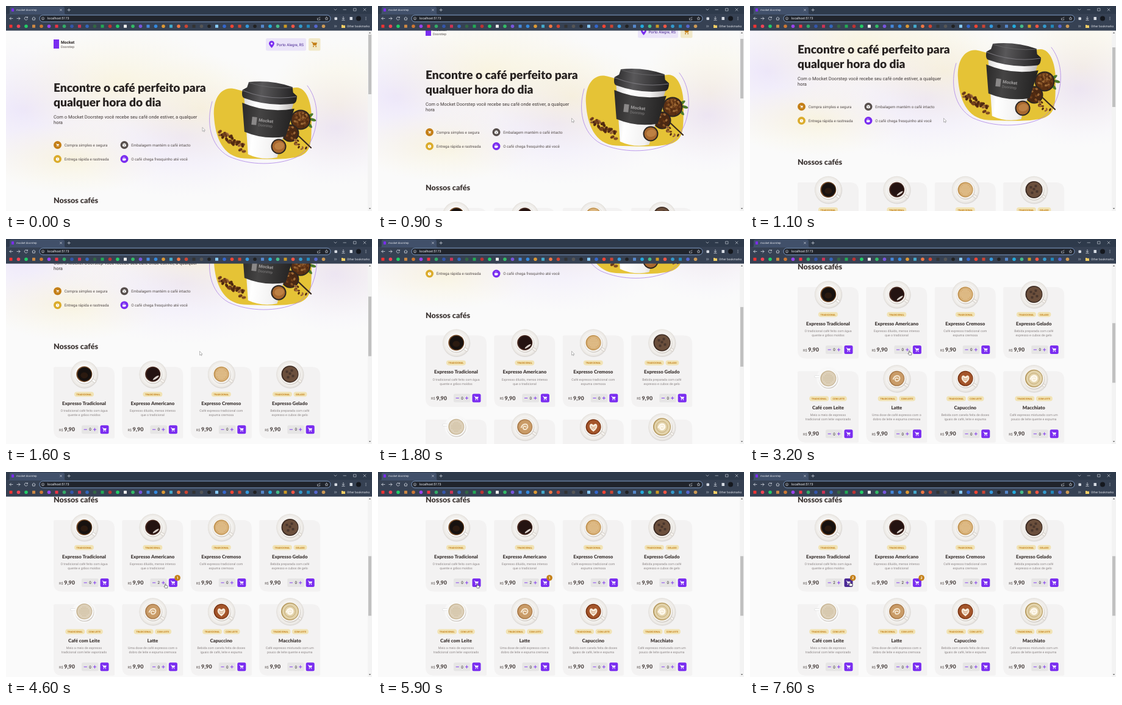
These frames come from a looping animation (600x337 px, 8000 ms). An HTML page:

```html
<!DOCTYPE html>
<html lang="pt-BR">
<head>
<meta charset="utf-8">
<title>mocket doorstep</title>
<style>
html, body { margin: 0; width: 100%; height: 100%; overflow: hidden; background: #fafafa; }
svg { display: block; width: 600px; height: 337px; text-rendering: geometricPrecision; }
text { font-family: Roboto, sans-serif; }
.h { font-family: Lato, sans-serif; font-weight: 900; }
</style>
</head>
<body>
<svg id="stage" viewBox="0 0 600 337">
  <defs>
    <radialGradient id="lilac"><stop offset="0" stop-color="#e0d4fa" stop-opacity=".5"/><stop offset="1" stop-color="#ece4fb" stop-opacity="0"/></radialGradient>
    <radialGradient id="cream"><stop offset="0" stop-color="#f7ecc0" stop-opacity=".45"/><stop offset="1" stop-color="#f8f0d0" stop-opacity="0"/></radialGradient>
    <radialGradient id="saucer"><stop offset=".6" stop-color="#dfdcd9"/><stop offset=".73" stop-color="#f5f4f2"/><stop offset=".94" stop-color="#ece9e5"/><stop offset="1" stop-color="#e0ddd8"/></radialGradient>
    <linearGradient id="paper"><stop offset="0" stop-color="#d9d8d8"/><stop offset=".25" stop-color="#fff"/><stop offset=".7" stop-color="#f2f1f1"/><stop offset="1" stop-color="#bdb9b7"/></linearGradient>
    <linearGradient id="sleeve"><stop offset="0" stop-color="#2a2929"/><stop offset=".35" stop-color="#454444"/><stop offset="1" stop-color="#232222"/></linearGradient>
    <linearGradient id="lid"><stop offset="0" stop-color="#2b2a2b"/><stop offset=".35" stop-color="#59585a"/><stop offset="1" stop-color="#201f20"/></linearGradient>
    <g id="cart"><path d="M-4-3.4h1.7l.5 1.2h5.6l-1.2 3.6h-4.2l-1.3-4h-1.1z"/><circle cx="-1.2" cy="2.9" r=".9"/><circle cx="2.2" cy="2.9" r=".9"/></g>
  </defs>
  <g id="page"></g>
  <g id="bar"></g>
  <g id="chrome"></g>
  <g id="cursor">
    <path id="arrow" d="M-2-3.5v6.6l1.6-1.4 1 2.2 1-.5-1-2.1h2z" fill="#fff" stroke="#777" stroke-width=".5"/>
    <path id="hand" d="M-1.3-3.5q.8-.7 1.2.2v2l2.6.7q.7.3.5 1.2l-.5 2.7h-3.6l-2-2.6q0-1 1.8-.1z" fill="#fff" stroke="#222" stroke-width=".55"/>
  </g>
</svg>
<script>
const $ = id => document.getElementById(id);
const PURPLE = '#7a2df0', DARK = '#4b2995', GOLD = '#c47f17', INK = '#403937';

const rect = (x, y, w, h, fill, r = 0, extra = '') => `<rect x="${x}" y="${y}" width="${w}" height="${h}" rx="${r}" fill="${fill}" ${extra}/>`;
const disc = (x, y, r, fill, extra = '') => `<circle cx="${x}" cy="${y}" r="${r}" fill="${fill}" ${extra}/>`;
const oval = (x, y, rx, ry, fill, turn = 0) => `<ellipse rx="${rx}" ry="${ry}" fill="${fill}" transform="translate(${x} ${y}) rotate(${turn})"/>`;
const path = (d, fill, stroke = 'none', w = 1) => `<path d="${d}" fill="${fill}" stroke="${stroke}" stroke-width="${w}" stroke-linecap="round"/>`;
const line = (d, color, w = .9) => path(d, 'none', color, w);
const text = (x, y, size, fill, s, extra = '') => `<text x="${x}" y="${y}" font-size="${size}" fill="${fill}" ${extra}>${s}</text>`;
const at = (x, y, body, more = '') => `<g transform="translate(${x} ${y}) ${more}">${body}</g>`;
const cart = (x, y, fill, k = 1) => `<use href="#cart" fill="${fill}" transform="translate(${x} ${y}) scale(${k})"/>`;
const MID = 'text-anchor="middle" ', HEAD = 'class="h"';

let seed = 7;
const rnd = () => (seed = seed * 16807 % 2147483647) / 2147483647;
const bean = (x, y, k = 1) => {
  const a = rnd() * 180, c = ['#7c4720', '#98602c', '#5a3013', '#b27a40'][rnd() * 4 | 0];
  return at(x, y, oval(0, 0, 3.4, 2.3, c) + line('M-2.6 0q2.6-1 5.2 0', '#2c1406', .5), `rotate(${a}) scale(${k})`);
};

function bowl(x, y, r, fill, beans) {
  let s = disc(x, y, r, '#2d2622') + disc(x, y, r - 2, fill);
  for (let i = 0; i < beans; i++) {
    const a = rnd() * 6.28, d = Math.sqrt(rnd()) * (r - 4);
    s += bean(x + Math.cos(a) * d, y + Math.sin(a) * d, .7);
  }
  return s;
}

function picture() {
  let s = path('M341 182C339 155 350 136 368 135.5C382 135.5 395 146 425 146C450 146 462 134 476 134C493 134 502 160 501 190C500 220 503 240 480 247.5C455 254 420 251.5 390 250.5C355 248 343 215 341 182Z', '#e5c336');
  s += line('M338 157C328 190 334 230 365 247C400 263 445 262 475 249C506 235 524 170 494 131', '#ab82e6', .8);
  for (const [x, y, a] of [[463, 179, 30], [460, 188, -20], [499, 180, -35], [503, 187, 15], [456, 206, 60], [498, 196, 50]])
    s += oval(x, y, 5.5, 2.3, '#4c7a2b', a);
  s += line('M480 214L500 233', '#3a2a1e', 2.2);
  s += bowl(483, 187, 16.5, '#5a3014', 45) + bowl(466, 209, 14.5, '#4a2813', 14);
  for (let i = 0; i < 12; i++) s += bean(463 + rnd() * 30, 219 + rnd() * 18, .7);
  const body = path('M-41 8L-24 101Q0 109 24 101L41 8Z', 'url(#paper)')
    + path('M-43 18Q0 31 43 18L34 65Q0 75-34 65Z', 'url(#sleeve)')
    + path('M-45-3Q-46 8-41 10Q0 20 41 10Q46 8 45-3L38-8L36-17Q0-25-36-17L-38-8Z', 'url(#lid)')
    + line('M-44-2Q0 10 44-2', '#77757a', 1) + line('M-36-16Q0-9 36-16', '#6b6a6d', .8)
    + rect(-24, 39, 8, 13, '#8a8888') + text(-13, 45.5, 7.2, '#a2a0a0', 'Mocket', 'font-weight="700"') + text(-13, 53, 5.9, '#858383', 'Doorstep');
  s += at(432, 146, body, 'rotate(6.5)');
  s += bowl(447, 231, 12.5, '#a8682f', 0) + oval(448, 230, 8, 6, '#bd8043', -15);
  for (let i = 0; i < 26; i++) s += bean(348 + i * 1.55 + rnd() * 5, 209 + i * 1.05 + (rnd() - .5) * 13, 1.05);
  return s;
}

function hero() {
  let s = '';
  for (const [x, y, rx, ry, g] of [[30, 170, 170, 115, 'lilac'], [185, 130, 190, 95, 'cream'], [110, 250, 150, 60, 'cream'],
    [290, 215, 200, 100, 'lilac'], [320, 170, 130, 90, 'cream'], [545, 165, 120, 110, 'cream'], [540, 200, 140, 95, 'lilac']])
    s += oval(x, y, rx, ry, `url(#${g})`);
  s += rect(78, 55, 9, 15, PURPLE) + text(90, 62, 6.6, '#272221', 'Mocket', 'font-weight="700"') + text(90, 69.3, 5.4, '#574f4d', 'Doorstep');
  s += rect(426, 53, 66, 20.5, '#ebe5f9', 2.5) + path('M435.5 69Q431 64 431 61.7A4.4 4.4 0 0 1 439.9 61.7Q439.9 64 435.5 69Z', PURPLE) + disc(435.5, 61.8, 1.6, '#fff');
  s += text(443.5, 65.6, 6.2, DARK, 'Porto Alegre, RS') + rect(496, 53, 19.5, 20.5, '#f1e9c9', 2.5) + cart(505.5, 63, GOLD, 1.2);
  s += text(78, 140.8, 19.15, '#272221', 'Encontre o café perfeito para', HEAD) + text(78, 165, 19.15, '#272221', 'qualquer hora do dia', HEAD);
  s += text(78, 185, 7.55, INK, 'Com o Mocket Doorstep você recebe seu café onde estiver, a qualquer') + text(78, 194.2, 7.55, INK, 'hora');
  [['Compra simples e segura', GOLD], ['Embalagem mantém o café intacto', '#574f4d'], ['Entrega rápida e rastreada', '#dbac2c'], ['O café chega fresquinho até você', PURPLE]].forEach(([label, c], i) => {
    const x = i % 2 ? 194 : 84.5, y = i < 2 ? 228.5 : 251.5;
    const icon = [cart(0, 0, '#fff', .65), path('M0-3L3-1.5V1.7L0 3.2L-3 1.7V-1.5Z', '#fff') + line('M-3-1.5L0 0L3-1.5M0 0V3', c, .5),
      disc(0, .3, 2.7, '#fff') + line('M0-1.2V.4L1 .9', c, .6), path('M-3-1H2.2V1.5Q2 2.8.6 2.8H-1.4Q-2.8 2.8-3 1.5Z', '#fff') + line('M2.2-.3Q4 .5 2.2 1.6M-1.5-3V-2M.3-3V-2', '#fff', .6)][i];
    s += disc(x, y, 6.5, c) + at(x, y, icon) + text(x + 11.2, y + 2.2, 6.25, '#574f4d', label);
  });
  return s + picture() + text(78, 324, 12.55, INK, 'Nossos cafés', HEAD);
}

// Drawings seen from above, centred on 0,0: coffee radius, edge tone, inner tone, topping.
const swirl = c => line('M-6 1Q-3-6 3-4Q7 0 2 4Q-3 5-3 1Q-1-2 2 0', c, 2);
const ring = (r, c) => disc(0, 0, r, 'none', `stroke="${c}" stroke-width="1"`);
const dots = c => Array.from({ length: 49 }, (_, i) => [(i % 7 - 3) * 2.4, ((i / 7 | 0) - 3) * 2.4])
  .filter(([x, y]) => x * x + y * y < 70).map(([x, y]) => disc(x, y, .7, c)).join('');
const heart = path('M0 8Q-8 2-6-3Q-4-7 0-3Q4-7 6-3Q8 2 0 8Z', '#f7ead8') + line('M-4-1Q0 3 4-1M-3 2Q0 5 3 2', '#b87343', .8);
const ice = [[-5, -4], [3, -6], [5, 3], [-3, 5], [0, -1]].map(([x, y]) => rect(x - 2, y - 2, 4, 4, '#4a372d', 1)).join('');
const drinks = [
  ['Expresso Tradicional', 'O tradicional café feito com água', 'quente e grãos moídos', '', 13, '#7a4f2b', '#17110f', oval(0, 2, 6, 5, '#2b1a10')],
  ['Expresso Americano', 'Expresso diluído, menos intenso', 'que o tradicional', '', 12.5, '#4a2b22', '#241311', oval(5, 6, 6, 1.6, '#d9cfc8', -35)],
  ['Expresso Cremoso', 'Café expresso tradicional com', 'espuma cremosa', '', 12.5, '#c0924f', '#d9b27a', dots('#ead0a4')],
  ['Expresso Gelado', 'Bebida preparada com café', 'expresso e cubos de gelo', 'GELADO', 14, '#3b2a22', '#6b4f3c', ice],
  ['Café com Leite', 'Meio a meio de expresso', 'tradicional com leite vaporizado', 'COM LEITE', 13, '#c9b797', '#ddd0b9', dots('#c8b795')],
  ['Latte', 'Uma dose de café expresso com o', 'dobro de leite e espuma cremosa', 'COM LEITE', 12.5, '#a97a49', '#c99b67', swirl('#f5e6cf')],
  ['Capuccino', 'Bebida com canela feita de doses', 'iguais de café, leite e espuma', 'COM LEITE', 12.5, '#7c3614', '#a4552a', heart],
  ['Macchiato', 'Café expresso misturado com um', 'pouco de leite quente e espuma', 'COM LEITE', 14.5, '#b59a5f', '#e3d3ab', ring(9, '#c6ad78') + disc(0, 0, 6, '#f4ead3') + swirl('#fffaf0')],
];

function mug([, , , , r, edge, core, top], i) {
  const tone = i % 4 ? '#f5f2ee' : '#fafafa';
  const base = i === 4
    ? disc(0, 0, 19, '#f8f8f8') + line('M-21-3H-13', '#dedede', 4) + line('M-21-3H-13', '#fff', 2.4)
    : disc(.5, 1, 22.5, '#dedbd9') + disc(0, 0, 22.2, 'url(#saucer)') + line('M10 7L17 12', '#d3cec8', 5) + line('M10 7L17 12', tone, 3.2);
  return base + disc(.5, 1, r + 2.7, '#d2cdc7') + disc(0, 0, r + 2.3, tone) + disc(0, 0, r, edge) + disc(.4, 0, r - 1.5, core) + top;
}

function tags(extra) {
  const list = [['TRADICIONAL', 32]];
  if (extra) list.push([extra, extra === 'GELADO' ? 22 : 27]);
  let x = 50 - list.reduce((n, [, w]) => n + w + 2.5, -2.5) / 2;
  return list.map(([s, w]) => {
    const out = rect(x, 41, w, 8.2, '#f1e3b5', 4.1) + text(x + w / 2, 46.5, 3.85, GOLD, s, MID + 'font-weight="700"');
    x += w + 2.5;
    return out;
  }).join('');
}

function card(d, i) {
  const body = path('M2.5 0H86Q100 0 100 14V115Q100 117.5 97.5 117.5H14Q0 117.5 0 103.5V2.5Q0 0 2.5 0Z', '#f3f2f2')
    + at(50.3, 12, mug(d, i)) + tags(d[3])
    + text(50, 62.7, 7.8, INK, d[0], MID + HEAD)
    + text(50, 74, 5.25, '#8d8686', d[1], MID) + text(50, 81, 5.25, '#8d8686', d[2], MID)
    + text(9, 105.6, 5.5, '#574f4d', 'R$') + text(17.2, 106, 9, '#574f4d', '9,90', HEAD)
    + rect(46, 96, 27.5, 14, '#e6e5e5', 2.5) + line('M50 103H54.4M65.3 103H69.7M67.5 100.8V105.2', PURPLE, .9)
    + text(60, 105.3, 6.3, '#272221', '0', `${MID}id="qty${i}"`)
    + rect(76.5, 96, 14, 14, PURPLE, 2.5, `id="buy${i}"`) + cart(83.3, 103, '#fff', .92)
    + `<g id="badge${i}" visibility="hidden">${disc(90.7, 95, 4.8, GOLD)}${text(90.7, 97.1, 5.8, '#fff', '1', `${MID}font-weight="700" id="count${i}"`)}</g>`;
  return at(78 + i % 4 * 112.4, 353 + (i / 4 | 0) * 138.3, body);
}

function browser() {
  const W = '#d5dae2';
  let s = rect(0, 0, 600, 14, '#2e3a4b') + rect(0, 13, 600, 27.5, '#364153') + path('M3 14Q6 14 6 11V4Q6 1 9 1H93Q96 1 96 4V11Q96 14 99 14Z', '#41506a');
  s += rect(9, 4, 4, 5, PURPLE) + text(17, 8.4, 4.45, '#e7eaf0', 'mocket doorstep');
  s += line('M88.5 5L91.5 8M91.5 5L88.5 8M101 6.5H105.4M103.2 4.3V8.7', W, .7);
  s += line('M538 5L540 7L542 5M553 6H557.5M570 4H574V8H570ZM586 4L590 8M590 4L586 8', W, .6);
  s += rect(55, 15, 477, 11, '#20242c', 5.5, 'stroke="#86a8d6" stroke-width=".9"') + text(68, 22.4, 5.4, '#eceff4', 'localhost:5173');
  s += line('M11 20.5H6M8.2 18.3L6 20.5L8.2 22.7M18 20.5H23M20.8 18.3L23 20.5L20.8 22.7M35 18.8A2.6 2.6 0 1 0 35.3 21.6M35.4 17.8V19.3H33.9M43 20.5L45.5 18L48 20.5M43.7 20V23H47.3V20', W, .8);
  s += disc(60.5, 20.5, 2.2, 'none', `stroke="${W}" stroke-width=".6"`) + line('M60.5 20.3V21.6', W, .7);
  s += line('M510.5 20V23H514.5V21M511.7 21Q512 19 515 18.5M525.5 18L526.2 19.8L528 20L526.7 21.2L527 23L525.5 22.1L524 23L524.3 21.2L523 20L524.8 19.8Z', W, .6);
  s += rect(538.5, 18.5, 4.5, 4.5, W, 1) + line('M553 17.5V21.5M551.2 20L553 21.8L554.8 20M550.8 23.3H555.2', W, .8) + rect(563.5, 18, 4.5, 5, W, .5) + disc(578, 20.5, 4, '#15181e');
  for (let i = -1; i < 2; i++) s += disc(590, 20.5 + i * 2, .6, W);
  const colors = 'e33 e45 2c6 c84 c73 94e e34 3a6 35a c35 36b 364 2a5 b33 2c6 eee 3b6 75d 48d 38d d93 4ac e74 c43 333 555 222 8cf 36c e43 c43 39d 222 58c 2ad 4b8 c92 e54 39c 28b 56c c95'.split(' ');
  colors.forEach((c, i) => {
    const x = 8 + i * 12.5;
    s += i % 3 ? disc(x, 33.3, 2.8, '#' + c) : rect(x - 2.5, 30.8, 5, 5, '#' + c, .6);
  });
  return s + line('M538.5 32L540 33.3L538.5 34.6M540.7 32L542.2 33.3L540.7 34.6', W, .6)
    + path('M550 31H552L552.8 31.8H556V36H550Z', '#f5cf65') + text(559, 35.1, 4.85, '#e7eaf0', 'Other bookmarks');
}

$('page').innerHTML = rect(0, 0, 600, 700, '#fafafa') + hero() + drinks.map(card).join('');
$('bar').innerHTML = rect(593, 40, 7, 297, '#f3f3f3') + path('M594.8 45L596.5 43L598.2 45ZM594.8 332L596.5 334L598.2 332Z', '#666')
  + rect(594, 47, 5, 98, '#c1c1c1', 0, 'id="thumb"');
$('chrome').innerHTML = browser();

// Rows of time followed by values, joined linearly.
const scroll = [[800, 0], [1100, 63], [1300, 117], [1500, 117], [1800, 194.5], [2200, 274]];
const pointer = [[0, 324, 203], [300, 322, 197], [500, 322, 197], [700, 319.5, 188], [2300, 319.5, 188], [3200, 262, 187.5], [4200, 262, 187.5],
  [4300, 273, 186], [4500, 273, 186], [4600, 262, 187.5], [5200, 208, 194], [5400, 208, 194], [5900, 163.5, 187.5], [6300, 147, 186], [7000, 147, 186], [7300, 165, 184.5]];
function mix(rows, t) {
  const n = rows.findIndex(r => r[0] > t);
  if (n < 0) return rows[rows.length - 1].slice(1);
  if (!n) return rows[0].slice(1);
  const a = rows[n - 1], b = rows[n], k = (t - a[0]) / (b[0] - a[0]);
  return a.slice(1).map((v, i) => v + (b[i + 1] - v) * k);
}
const show = (id, on) => $(id).setAttribute('visibility', on ? 'visible' : 'hidden');

function draw(now) {
  const t = Math.floor(now % 8000 / 100) * 100;
  const [s] = mix(scroll, t), [x, y] = mix(pointer, t);
  $('page').setAttribute('transform', `translate(0 ${-s})`);
  $('thumb').setAttribute('y', 47 + s / 3);
  $('cursor').setAttribute('transform', `translate(${x} ${y})`);
  const hand = t >= 3200 && !(t > 4600 && t < 5900);
  show('hand', hand);
  show('arrow', !hand);
  $('qty1').textContent = (t >= 3300) + (t >= 3700);
  $('qty0').textContent = (t >= 6400) + (t >= 6700);
  show('badge1', t >= 4300);
  show('badge0', t >= 7400);
  $('count0').textContent = $('count1').textContent = t >= 7400 ? 2 : 1;
  $('buy1').setAttribute('fill', t >= 4300 && t < 4600 ? DARK : PURPLE);
  $('buy0').setAttribute('fill', t >= 7200 ? DARK : PURPLE);
}
const start = performance.now();
(function tick() {
  draw(performance.now() - start);
  requestAnimationFrame(tick);
})();
</script>
</body>
</html>
```
